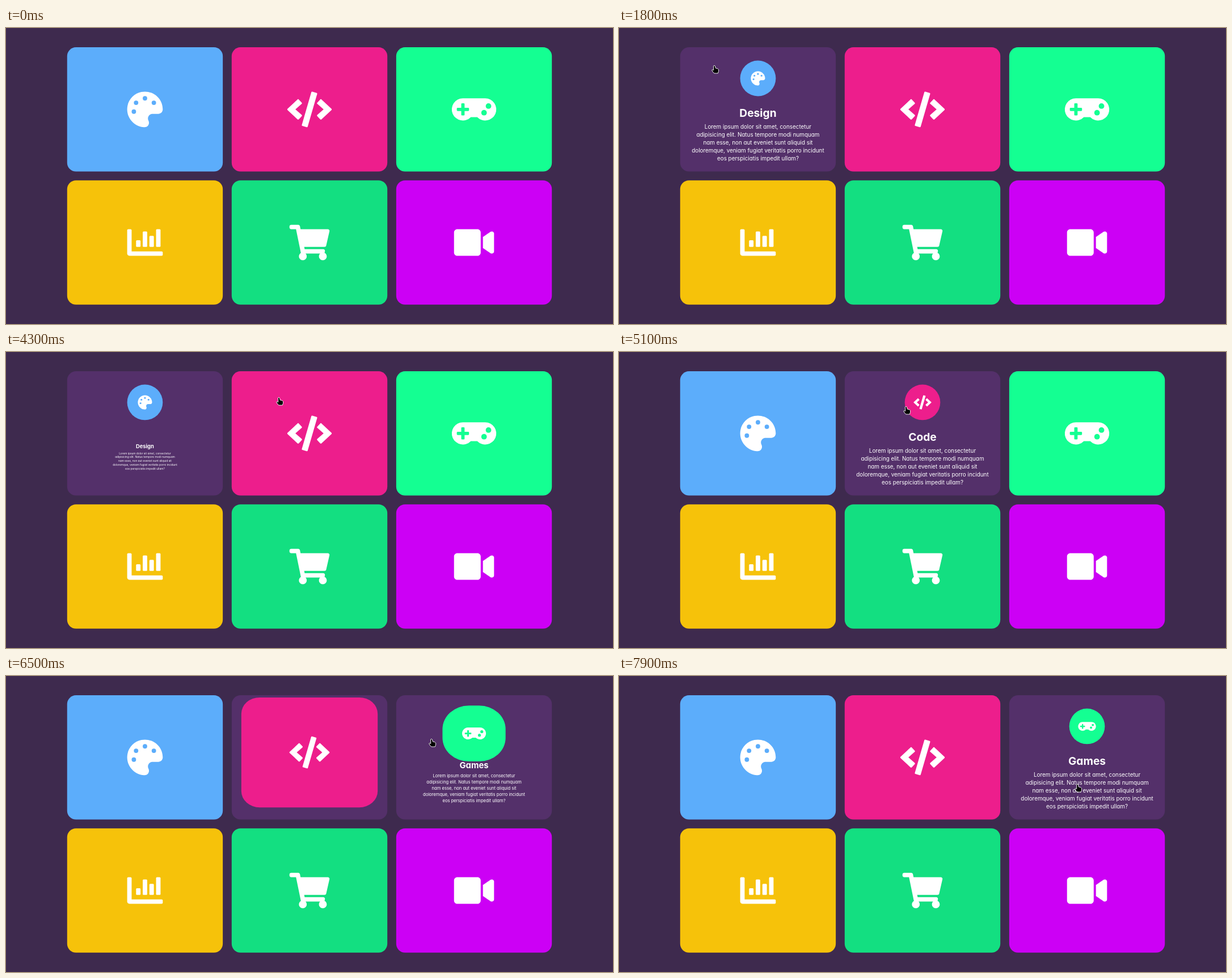
Animation of 1070x523 px, one loop 8 s. Source, as an HTML page:

```html
<!DOCTYPE html>
<html lang="en">
<head>
<meta charset="utf-8">
<title>Service cards</title>
<style>
  html, body { margin: 0; width: 100%; height: 100%; overflow: hidden; background: #3e2a4e; }
  svg { display: block; width: 1070px; height: 523px; }
  text { font-family: Inter, "Open Sans", sans-serif; font-feature-settings: "cv11"; text-anchor: middle; fill: #fff; }
  .title { font-size: 24.5px; font-weight: 700; }
  .body { font-size: 12.6px; }
  .panel { fill: #54306a; }
  .icon { fill: #fff; fill-rule: evenodd; }
  #hand { fill: #000; stroke: #fff; stroke-width: .9; stroke-linejoin: round; }
</style>
</head>
<body>
<svg id="stage" viewBox="0 0 1365 667.19" preserveAspectRatio="none">
  <g id="cards"></g>
  <path id="hand" d="M-1.5 1Q0-.6 1.3 1L2.3 5Q6.6 5 7.6 7.6Q8 10.5 6.3 14H-.2Q-3.6 11-4.3 8.2Q-3.6 6.8-1.2 8.4Z"/>
</svg>
<script>
const LOOP = 8000, DURATION = 500, UNIT = 1365 / 1070;
const W = 350, H = 280, GAP = 20, LEFT = 137.5, TOP = 43.5;

const LINES = [
  'Lorem ipsum dolor sit amet, consectetur',
  'adipisicing elit. Natus tempore modi numquam',
  'nam esse, non aut eveniet sunt aliquid sit',
  'doloremque, veniam fugiat veritatis porro incidunt',
  'eos perspiciatis impedit ullam?'
];

const path = d => `<path d="${d}"/>`;
const dot = (x, y, r, fill) => `<circle cx="${x}" cy="${y}" r="${r}" fill="${fill}"/>`;
const bar = (x, y) => `<rect x="${x}" y="${y}" width="64" height="${320 - y}" rx="12.8"/>`;

// Icons are drawn on a 512-high grid; w is the grid width.
const icons = {
  palette: { w: 512, draw: c =>
    path('M204.3 5C104.9 24.4 24.8 104.3 5.2 203.4c-37 187 131.7 326.4 258.8 306.7 41.2-6.4 61.4-54.6 42.5-91.7-23.1-45.4 9.9-98.4 60.9-98.4h79.7c35.8 0 64.8-29.6 64.9-65.3C511.5 97.1 368.1-26.9 204.3 5z') +
    dot(96, 288, 32, c) + dot(128, 160, 32, c) + dot(256, 96, 32, c) + dot(384, 160, 32, c) },
  code: { w: 640, draw: () =>
    path('M278.9 511.5l-61-17.7c-6.4-1.8-10-8.5-8.2-14.9L346.2 8.7c1.8-6.4 8.5-10 14.9-8.2l61 17.7c6.4 1.8 10 8.5 8.2 14.9L293.8 503.3c-1.9 6.4-8.5 10.1-14.9 8.2z') +
    path('M164.9 399.3l43.5-46.4c4.6-4.9 4.3-12.7-.8-17.2L117 256l90.6-79.7c5.1-4.5 5.5-12.3.8-17.2l-43.5-46.4c-4.5-4.8-12.1-5.1-17-.5L3.8 247.2c-5.1 4.7-5.1 12.8 0 17.5l144.1 135.1c4.9 4.6 12.5 4.4 17-.5z') +
    path('M492.1 399.9l144.1-135.1c5.1-4.7 5.1-12.8 0-17.5L492.1 112.1c-4.8-4.5-12.4-4.3-17 .5L431.6 159c-4.6 4.9-4.3 12.7.8 17.2L523 256l-90.6 79.7c-5.1 4.5-5.5 12.3-.8 17.2l43.5 46.4c4.5 4.9 12.1 5.1 17 .6z') },
  gamepad: { w: 640, draw: c =>
    path('M480 96H160a160 160 0 1 0 114.24 272h91.52A160 160 0 1 0 480 96zM248 268a12 12 0 0 1-12 12h-52v52a12 12 0 0 1-12 12h-24a12 12 0 0 1-12-12v-52H84a12 12 0 0 1-12-12v-24a12 12 0 0 1 12-12h52v-52a12 12 0 0 1 12-12h24a12 12 0 0 1 12 12v52h52a12 12 0 0 1 12 12z') +
    dot(464, 304, 40, c) + dot(528, 208, 40, c) },
  chart: { w: 512, draw: () =>
    bar(128, 224) + bar(224, 96) + bar(320, 160) + bar(416, 64) +
    path('M496 384H64V80c0-8.84-7.16-16-16-16H16C7.16 64 0 71.16 0 80v336c0 17.67 14.33 32 32 32h464c8.84 0 16-7.16 16-16v-32c0-8.84-7.16-16-16-16z') },
  cart: { w: 576, draw: () =>
    path('M528.1 301.3l47.3-208C578.8 78.3 567.4 64 552 64H159.2l-9.2-44.8C147.8 8 137.9 0 126.5 0H24C10.7 0 0 10.7 0 24v16c0 13.3 10.7 24 24 24h69.9l70.2 343.4C147.3 417.1 136 435.2 136 456c0 30.9 25.1 56 56 56s56-25.1 56-56c0-15.7-6.4-29.8-16.8-40h209.6C430.4 426.2 424 440.3 424 456c0 30.9 25.1 56 56 56s56-25.1 56-56c0-22.2-12.9-41.3-31.6-50.4l5.5-24.3c3.4-15-8-29.3-23.4-29.3H218.1l-6.5-32h293.1c11.2 0 20.9-7.8 23.4-18.7z') },
  video: { w: 576, draw: () =>
    path('M336.2 64H47.8C21.4 64 0 85.4 0 111.8v288.4C0 426.6 21.4 448 47.8 448h288.4c26.4 0 47.8-21.4 47.8-47.8V111.8c0-26.4-21.4-47.8-47.8-47.8z') +
    path('M525.6 101.7L416 177.3v157.4l109.6 75.5c21.2 14.6 50.4-.3 50.4-25.8V127.5c0-25.4-29.1-40.4-50.4-25.8z') }
};

// open/close: when the coloured face starts to shrink or grow back; fade: when the text starts to leave.
const cards = [
  { icon: 'palette', color: '#5cadfb', title: 'Design', open: 1318, close: 4400, fade: 4150 },
  { icon: 'code', color: '#ed1e8c', title: 'Code', open: 4400, close: 6230 },
  { icon: 'gamepad', color: '#14ff92', title: 'Games', open: 6265 },
  { icon: 'chart', color: '#f6c20a' },
  { icon: 'cart', color: '#13df81' },
  { icon: 'video', color: '#cc00f5' }
];

// Spans in which the picture moves, at ten pictures per second; it rests between them.
const SPANS = [[0, 0], [1000, 1800], [2000, 2200], [3100, 3100], [4300, 4300], [4500, 4500],
  [4700, 4900], [5100, 5100], [5300, 5500], [5700, 6700], [6900, 7100], [7500, 7900]];

// Pointer path: time, x, y
const POINTS = [[1000, 138, 12], [1300, 146, 36], [1400, 150, 44], [1800, 168, 66], [2200, 172, 68],
  [3100, 238, 69], [4300, 481, 80], [4500, 488, 91], [4900, 498, 104], [5100, 506, 96],
  [5500, 543, 107], [5700, 556, 110], [6200, 676, 113], [6500, 750, 111], [7100, 772, 112],
  [7400, 772, 112], [7900, 808, 191]];

const lerp = (a, b, p) => a + (b - a) * p;

// cubic-bezier(.25, .1, .25, 1)
function ease(x) {
  if (!(x > 0)) return 0;
  if (x >= 1) return 1;
  const curve = (a, b, u) => 3 * a * u * (1 - u) ** 2 + 3 * b * u * u * (1 - u) + u ** 3;
  let lo = 0, hi = 1;
  for (let i = 0; i < 24; i++) {
    const mid = (lo + hi) / 2;
    if (curve(.25, .25, mid) < x) lo = mid; else hi = mid;
  }
  return curve(.1, 1, lo);
}

const progress = (t, from, to) => ease((t - from) / DURATION) - ease((t - to) / DURATION);

function hold(t) {
  const tick = Math.floor(t / 100) * 100;
  const [, end] = SPANS.filter(([start]) => start <= tick).pop();
  return Math.min(tick, end);
}

function pointerAt(t) {
  const i = POINTS.findIndex(p => p[0] >= t);
  if (i < 1) return POINTS[0].slice(1);
  const [t0, x0, y0] = POINTS[i - 1], [t1, x1, y1] = POINTS[i];
  const p = (t - t0) / (t1 - t0);
  return [lerp(x0, x1, p), lerp(y0, y1, p)];
}

function copy(title) {
  if (!title) return '';
  const rows = LINES.map((s, i) => `<text class="body" x="175" y="${183.6 + 18 * i}">${s}</text>`);
  return `<text class="title" x="175" y="157">${title}</text>${rows.join('')}`;
}

const root = document.getElementById('cards');
const hand = document.getElementById('hand');

root.innerHTML = cards.map((c, i) => {
  const x = LEFT + (i % 3) * (W + GAP), y = TOP + Math.floor(i / 3) * (H + GAP);
  const panel = c.title ? `<rect class="panel" width="${W}" height="${H}" rx="20"/>` : '';
  return `<g transform="translate(${x} ${y})">${panel}<g class="copy">${copy(c.title)}</g>
    <rect class="face" fill="${c.color}"/><g class="icon">${icons[c.icon].draw(c.color)}</g></g>`;
}).join('');

[...root.children].forEach((el, i) => {
  for (const name of ['copy', 'face', 'icon']) cards[i][name + 'El'] = el.querySelector('.' + name);
});

function drawCard(card, t) {
  const p = progress(t, card.open, card.close);
  const w = lerp(W, 80, p), h = lerp(H, 80, p), y = 30 * p;
  const radius = side => 20 * (1 - p) + side / 2 * p;
  const shape = { x: (W - w) / 2, y, width: w, height: h, rx: radius(w), ry: radius(h) };
  for (const key in shape) card.faceEl.setAttribute(key, shape[key]);

  const size = lerp(80, 32, p) / 512;
  card.iconEl.setAttribute('transform',
    `translate(${W / 2} ${y + h / 2}) scale(${size}) translate(${-icons[card.icon].w / 2} -256)`);

  const s = progress(t, card.open, card.fade || card.close);
  card.copyEl.setAttribute('transform', `translate(175 190) scale(${s}) translate(-175 -190)`);
  card.copyEl.setAttribute('visibility', s > .001 ? 'visible' : 'hidden');
}

function render(now) {
  const t = hold(now % LOOP);
  cards.forEach(card => drawCard(card, t));
  const [x, y] = pointerAt(t);
  hand.setAttribute('transform', `scale(${UNIT}) translate(${x} ${y})`);
  hand.setAttribute('visibility', t < 1000 ? 'hidden' : 'visible');
}

const begin = performance.now();
function loop() {
  render(performance.now() - begin);
  requestAnimationFrame(loop);
}
loop();
</script>
</body>
</html>
```
